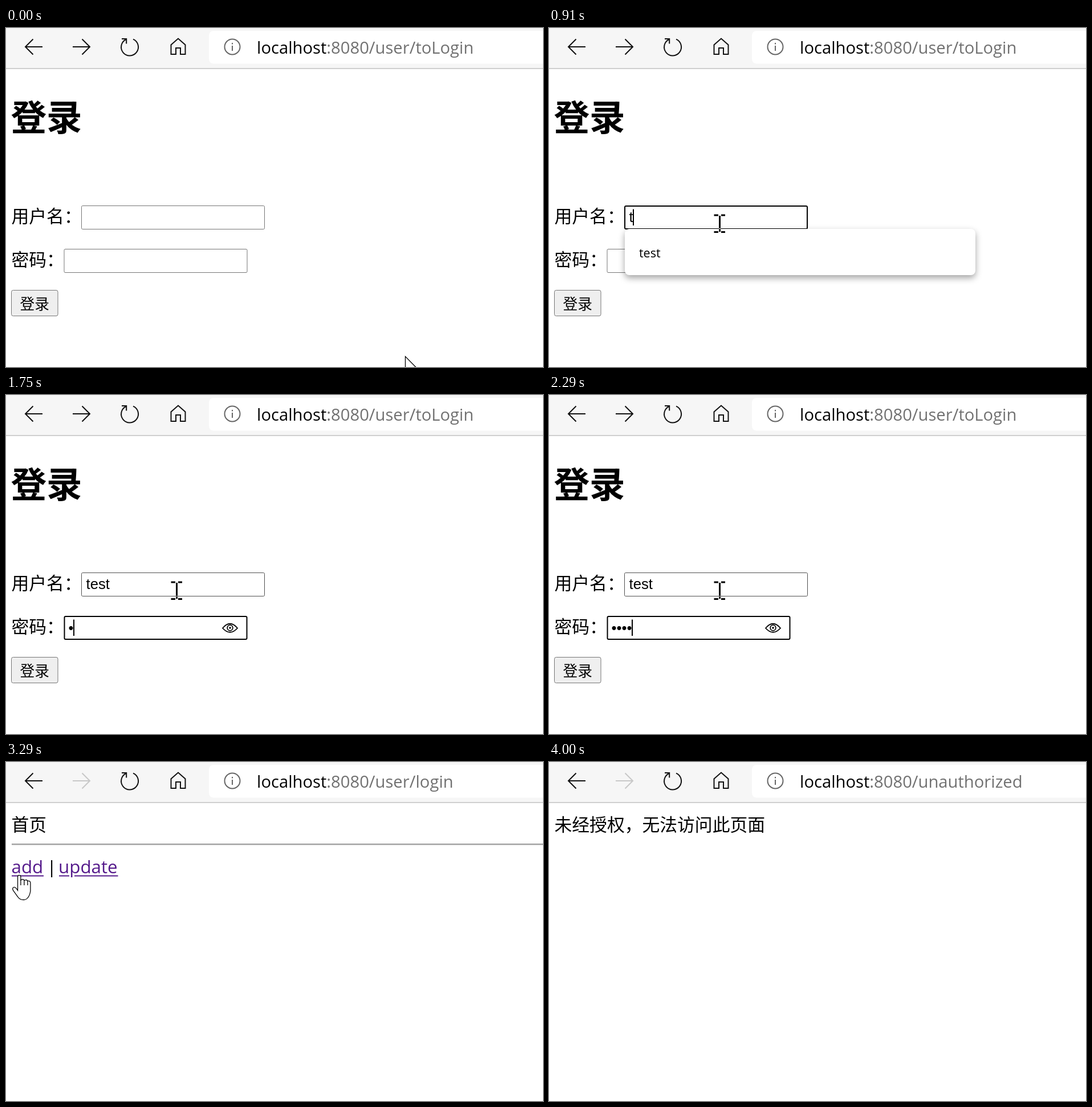
Recreate the animation shown at these times as an HTML page. Size 942 by 594 pixels, loop 4.69 s.

```html
<!DOCTYPE html>
<html lang="zh-CN">
<head>
<meta charset="utf-8">
<title>登录</title>
<style>
  html, body { margin: 0; width: 100%; height: 100%; overflow: hidden; background: #fff; }
  svg { display: block; isolation: isolate; }
  text { white-space: pre; }
  .ui { font-family: "Open Sans", "Noto Sans", sans-serif; }
  .cjk { font: 30.8px "Noto Sans CJK SC", "Noto Sans CJK", sans-serif; }
  .input { font: 25.67px "Liberation Sans", Arial, sans-serif; }
  .icon { fill: none; stroke: #111; stroke-width: 2; }
  .field { fill: #fff; stroke: #767676; }
  .field.hover { stroke: #4f4f4f; }
  .field.focus { stroke: #000; stroke-width: 2; }
  #ibeam { mix-blend-mode: difference; fill: none; stroke: #fff; stroke-width: 3; }
  #popup rect { fill: #fff; filter: drop-shadow(0 5px 6px rgba(0, 0, 0, .36)); }
  .link { fill: #551a8b; }
</style>
</head>
<body>
<svg width="942" height="594" viewBox="0 0 942 594">
  <rect width="942" height="594" fill="#fff"/>

  <rect width="942" height="70" fill="#f6f6f6"/>
  <rect y="70" width="942" height="2" fill="#cfcfcf"/>
  <rect x="356" y="5" width="610" height="57.5" rx="8" fill="#fff"/>
  <path class="icon" d="M64 33H34M47.5 19.5L34 33L47.5 46.5"/>
  <path class="icon" id="forward" d="M117 33H147M133.5 19.5L147 33L133.5 46.5"/>
  <path class="icon" id="reload" d="M223 19.700A15 15 0 1 1 210.5 20M203 19H211.2V27.5"/>
  <path class="icon" id="stop" d="M205 21L229 45M229 21L205 45"/>
  <path class="icon" d="M289.5 29.5L302 18.500L314.5 29.5V46H306V35H298V46H289.5Z"/>
  <g fill="none" stroke="#666" stroke-width="2">
    <circle cx="397" cy="33" r="13.5"/>
    <path d="M397 31V40M397 26V28.5"/>
  </g>
  <text class="ui" x="440" y="45" font-size="29.2">localhost<tspan id="path" fill="#717171"></tspan></text>

  <g id="login">
    <text class="cjk" x="8.500" y="180" style="font-size:62.5px;font-weight:700">登录</text>
    <text class="cjk" x="9.5" y="340.5">用户名：</text>
    <text class="cjk" x="9.5" y="416.5">密码：</text>
    <rect class="field" id="user" rx="2"/>
    <rect class="field" id="password" rx="2"/>
    <rect x="9.5" y="459.5" width="81.5" height="45" rx="3" fill="#efefef" stroke="#767676"/>
    <text class="cjk" x="24.5" y="492.5" style="font-size:25.67px">登录</text>
    <text class="input" id="userText" x="140.5" y="340"></text>
    <text class="input" id="dots" x="109.5" y="416.5"></text>
    <g id="eye" fill="none" stroke="#000" stroke-width="1.8">
      <path d="M380 408.5Q393 393 406 408.5Q393 423 380 408.5Z"/>
      <circle cx="393" cy="408" r="4.8"/>
      <circle cx="393" cy="408" r="1.8" fill="#000" stroke="none"/>
    </g>
    <rect id="caret" width="2" height="28.5"/>
    <g id="popup" class="ui" font-size="21.5">
      <rect x="133" y="352" width="615" height="81" rx="8"/>
      <text x="158" y="402">test</text>
      <g id="more">
        <text x="158" y="466">admin</text>
        <text x="158" y="530">guest</text>
        <text x="158" y="594">hello</text>
      </g>
    </g>
  </g>

  <g id="home">
    <text class="cjk" x="9.5" y="120.5">首页</text>
    <rect x="10" y="143" width="932" height="2" fill="#9a9a9a"/>
    <rect x="10" y="145" width="932" height="2" fill="#eee"/>
    <g class="ui" font-size="31.3">
      <text class="link" x="9.5" y="195">add</text>
      <text x="71.5" y="195">|</text>
      <text class="link" x="92" y="195">update</text>
    </g>
    <path d="M10 199.5H66M93 199.5H111M120 199.5H196.5" stroke="#551a8b" stroke-width="2"/>
  </g>

  <text class="cjk" id="denied" x="9.5" y="120.5">未经授权，无法访问此页面</text>

  <path id="ibeam" d="M-9.5 -15H-2M3 -15H10M-9.5 14.500H-2M3 14.500H10M.5 -14V14"/>
  <g fill="#fff" stroke="#000" stroke-width="1.3">
    <path id="arrow" d="M.5 .5V38L9 30L15 44L21 41.5L15.2 28H27.5Z"/>
    <g id="hand">
      <path d="M9.5 27V3a2.7 2.7 0 0 1 5.4 0V9q5-3 6 .5q5-2 6 1q5-1 5 4V28q-1 7-4 11q-3 4.5-8 4.5q-7 0-10-5L1.5 27q-2-4 1-5.5q3-1 7 5.5Z"/>
      <path fill="none" d="M14.9 8V18M20.9 9V18M26.9 10.5V18"/>
    </g>
  </g>
</svg>
<script>
const LOOP = 4690;
const USER = "test";
const USER_KEYS = [820, 1140, 1210, 1280];
const PASSWORD_KEYS = [1750, 1910, 2060, 2290];
const FIELD = { width: 322, height: 42 };

// time, pointer shape, x, y
const POINTER = [
  [0, "arrow", 700, 575], [70, "arrow", 660, 550], [140, "arrow", 560, 494],
  [210, "arrow", 450, 432], [290, "ibeam", 372, 388], [360, "ibeam", 322, 355],
  [430, "ibeam", 299, 343],
  [3050, "arrow", 280, 343], [3130, "arrow", 130, 277], [3210, "arrow", 0, 215],
  [3290, "hand", 11, 198], [3380, "hand", 11, 190], [3460, "hand", 10, 182],
  [3910, "arrow", 277, 342], [4000, "none", 0, 0]
];

const $ = id => document.getElementById(id);
const show = (id, on) => { $(id).style.display = on ? "" : "none"; };
const countPast = (times, t) => times.filter(time => time <= t).length;
const setAttributes = (id, values) => {
  for (const name in values) $(id).setAttribute(name, values[name]);
};

// Keeps the border inside the field's box whatever its weight.
function drawField(id, left, top, focus, x, y) {
  const hover = x > left && x < left + FIELD.width && y > top && y < top + FIELD.height;
  const inset = focus ? 1 : .5;
  setAttributes(id, {
    class: "field" + (focus ? " focus" : hover ? " hover" : ""),
    x: left + inset,
    y: top + inset,
    width: FIELD.width - 2 * inset,
    height: FIELD.height - 2 * inset
  });
}

function drawLogin(t, x, y) {
  const userFocus = t >= 500 && t < 1430;
  const passwordFocus = t >= 1430;
  const dots = countPast(PASSWORD_KEYS, t);
  $("userText").textContent = USER.slice(0, countPast(USER_KEYS, t));
  $("dots").textContent = "•".repeat(dots);
  show("eye", dots > 0);

  drawField("user", 132, 311, userFocus, x, y);
  drawField("password", 101.5, 387, passwordFocus, x, y);

  show("caret", userFocus || passwordFocus);
  const active = $(passwordFocus ? "dots" : "userText");
  const start = passwordFocus ? 109.5 : 140.5;
  setAttributes("caret", {
    x: Math.round(start + active.getComputedTextLength() - .5),
    y: passwordFocus ? 393.5 : 317.5
  });

  const wholeList = t < 910;
  show("popup", t >= 590 && t < 1280);
  show("more", wholeList);
  $("popup").firstElementChild.setAttribute("height", wholeList ? 273 : 81);
}

function draw(t) {
  const page = t < 2510 ? "login" : t < 3600 ? "home" : "denied";
  for (const id of ["login", "home", "denied"]) show(id, id === page);
  $("path").textContent = ":8080/" +
    { login: "user/toLogin", home: "user/login", denied: "unauthorized" }[page];
  $("forward").style.stroke = page === "login" ? "" : "#c8c8c8";

  const loading = (t >= 2430 && t < 2590) || (t >= 3530 && t < 3600);
  show("reload", !loading);
  show("stop", loading);

  const [, shape, x, y] = POINTER[countPast(POINTER.map(p => p[0]), t) - 1];
  for (const id of ["arrow", "ibeam", "hand"]) {
    show(id, id === shape);
    $(id).setAttribute("transform", `translate(${x} ${y})`);
  }
  if (page === "login") drawLogin(t, x, y);
}

const startTime = performance.now();
function tick() {
  draw((performance.now() - startTime) % LOOP);
  requestAnimationFrame(tick);
}
tick();
</script>
</body>
</html>
```
